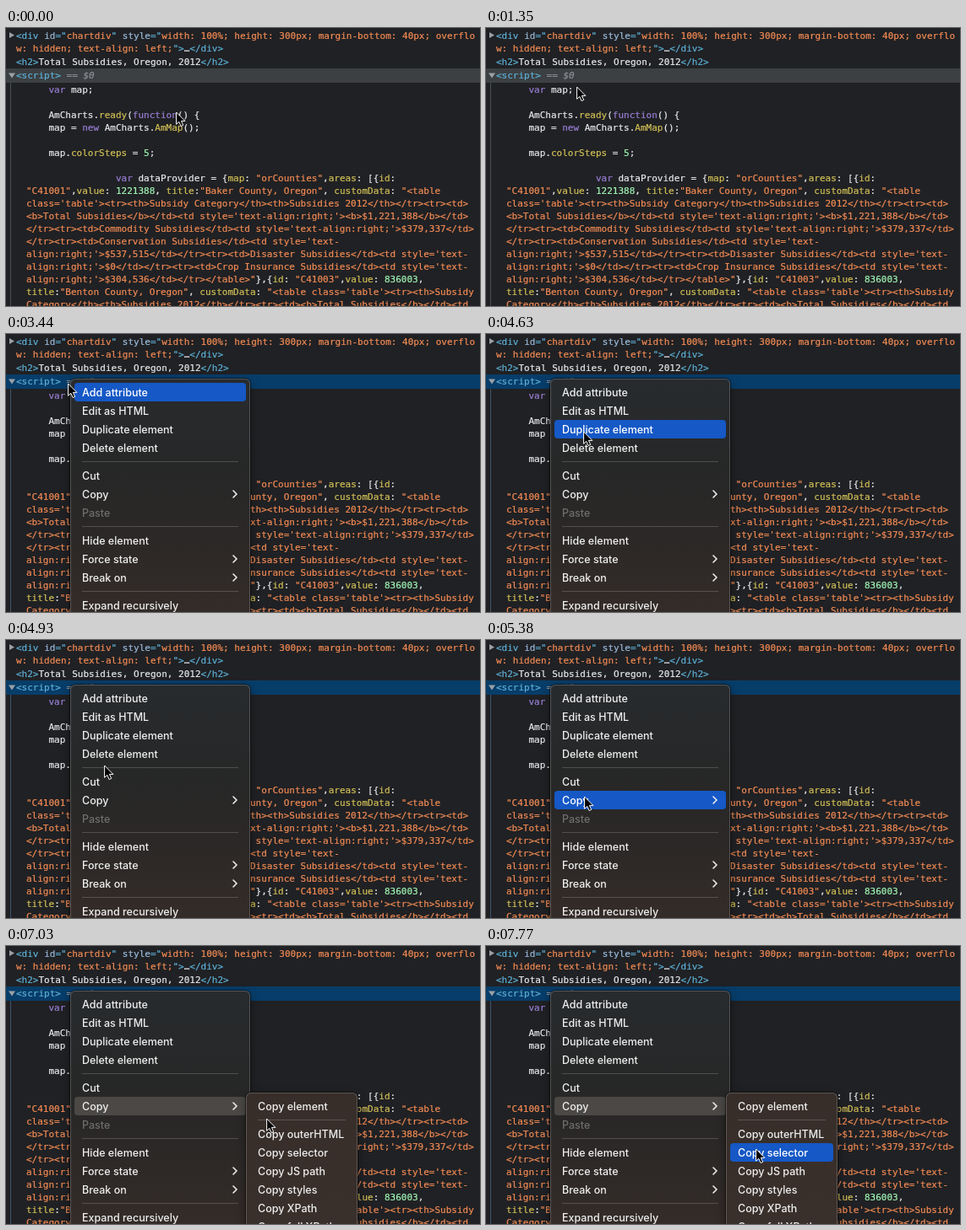
Write an HTML page that moves like this. It is 561 px wide and 330 px high and loops after 8 s.

```html
<!DOCTYPE html>
<html lang="en">
<head>
<meta charset="utf-8">
<title>Copy selector from the elements panel</title>
<style>
  html, body { margin: 0; width: 100%; height: 100%; overflow: hidden; background: #202124; }
  #stage { position: relative; width: 561px; height: 330px; overflow: hidden; background: #202124; }
  #stage > * { position: absolute; }

  .code {
    margin: 0; left: 12px; white-space: pre; color: #e8eaed; -webkit-text-stroke: .2px;
    font: 11px/15px "DejaVu Sans Mono", monospace;
  }
  .tag { color: #5db0d7; }
  .attr { color: #9bbbdc; }
  .str { color: #f28b54; }
  .key { color: #9a7fd5; }
  .prop { color: #d2c057; }
  .num { color: #a1f7b5; }
  .ref { color: #8d9196; }
  .plain { color: #e8eaed; }

  #row { left: 0; top: 48px; width: 561px; height: 17px; background: #3c4043; }
  #row.on { background: #073d69; }
  #guide { left: 5px; top: 65px; width: 1px; height: 265px; background: #4a4e53; }
  #row.on + #guide { background: #3d556d; }
  #source { left: 24px; top: 66px; }

  .menu {
    box-sizing: border-box; padding: 5px; border-radius: 6px; visibility: hidden;
    font: 500 12.5px/24px Inter, "Open Sans", sans-serif; color: #efefef;
    box-shadow: inset 0 0 0 1px rgba(255,255,255,.2), 0 0 0 1px rgba(0,0,0,.5), 0 4px 12px rgba(0,0,0,.4);
  }
  .menu.open { visibility: visible; }
  #main {
    left: 76px; top: 53px; width: 213px; height: 300px;
    background: linear-gradient(#282b2e, #262727 35%, #2b2827 60%, #342c29 95%);
  }
  #sub {
    left: 284px; top: 174px; width: 132px; height: 180px;
    background: linear-gradient(#372e2a, #3a302b);
  }
  .item { position: relative; height: 22px; padding-left: 9px; border-radius: 4px; white-space: nowrap; }
  .item.hot { background: #1558c6; color: #fff; }
  .item.trail { background: #4b4846; }
  .item.off { color: #706d6b; }
  .item svg { position: absolute; right: 9px; top: 6px; }
  hr { height: 1px; margin: 5px 9px; border: 0; background: rgba(255,255,255,.18); }
  #cursor { left: 0; top: 0; overflow: visible; }
</style>
</head>
<body>
<div id="stage">
  <div id="row"></div>
  <div id="guide"></div>
  <svg width="12" height="66" fill="#9aa0a6">
    <path d="M4 5 L10 8.5 L4 12Z M3 53.5 H11 L7 59.5Z"/>
  </svg>

  <pre class="code tag" style="top:2px">&lt;div <span class="attr">id</span>="<span class="str">chartdiv</span>" <span class="attr">style</span>="<span class="str">width: 100%; height: 300px; margin-bottom: 40px; overflo
w: hidden; text-align: left;</span>"&gt;<span class="plain">…</span>&lt;/div&gt;</pre>
  <pre class="code tag" style="top:33px">&lt;h2&gt;<span class="plain">Total Subsidies, Oregon, 2012</span>&lt;/h2&gt;</pre>
  <pre class="code tag" style="top:49px">&lt;script&gt; <span class="ref">== <i>$0</i></span></pre>
  <pre class="code" id="source">    var map;

    AmCharts.ready(function() {
    map = new AmCharts.AmMap();

    map.colorSteps = 5;

                var dataProvider = {map: "orCounties",areas: [{id:
"C41001",value: 1221388, title:"Baker County, Oregon", customData: "&lt;table
class='table'>&lt;tr>&lt;th>Subsidy Category&lt;/th>&lt;th>Subsidies 2012&lt;/th>&lt;/tr>&lt;tr>&lt;td>
&lt;b>Total Subsidies&lt;/b>&lt;/td>&lt;td style='text-align:right;'>&lt;b>$1,221,388&lt;/b>&lt;/td>
&lt;/tr>&lt;tr>&lt;td>Commodity Subsidies&lt;/td>&lt;td style='text-align:right;'>$379,337&lt;/td>
&lt;/tr>&lt;tr>&lt;td>Conservation Subsidies&lt;/td>&lt;td style='text-
align:right;'>$537,515&lt;/td>&lt;/tr>&lt;tr>&lt;td>Disaster Subsidies&lt;/td>&lt;td style='text-
align:right;'>$0&lt;/td>&lt;/tr>&lt;tr>&lt;td>Crop Insurance Subsidies&lt;/td>&lt;td style='text-
align:right;'>$304,536&lt;/td>&lt;/tr>&lt;/table>"},{id: "C41003",value: 836003,
title:"Benton County, Oregon", customData: "&lt;table class='table'>&lt;tr>&lt;th>Subsidy
Category&lt;/th>&lt;th>Subsidies 2012&lt;/th>&lt;/tr>&lt;tr>&lt;td>&lt;b>Total Subsidies&lt;/b>&lt;/td>&lt;td"</pre>

  <div class="menu" id="main"></div>
  <div class="menu" id="sub"></div>
  <svg id="cursor" width="12" height="18">
    <path d="M.6 1 V15.3 L3.8 12.3 L6.1 17.5 L8.7 16.4 L6.4 11.4 H10.9Z" fill="#000" stroke="#fff"/>
  </svg>
</div>

<script>
const LOOP = 8000, STEP = 148;
const $ = id => document.getElementById(id);

// Colour the script text
const kinds = ['str', 'key', 'prop', 'num'];
const tokens = /("[^"]*")|\b(var|new|function)\b|((?<=\.)\w+|\w+(?=:))|\b(\d+)\b/g;
const escape = s => s.replace(/&/g, '&amp;').replace(/</g, '&lt;');
const source = $('source');
const html = [];
let last = 0;
const text = source.textContent;
for (const m of text.matchAll(tokens)) {
  const kind = kinds[m.slice(1).findIndex(Boolean)];
  html.push(escape(text.slice(last, m.index)), `<span class="${kind}">${escape(m[0])}</span>`);
  last = m.index + m[0].length;
}
// The closing quote lies beyond the visible text
source.innerHTML = html.join('').replace(/"<\/span>$/, '</span>');

// Build menus: '-' separator, '>' submenu, '!' disabled
const chevron = '<svg width="8" height="10" fill="none" stroke="#efefef" stroke-width="1.6" ' +
  'stroke-linecap="round" stroke-linejoin="round"><path d="M2 1 L6 5 L2 9"/></svg>';

function build(menu, labels) {
  let y = menu.offsetTop + 5;
  const rows = [];
  for (const label of labels) {
    if (label === '-') {
      menu.append(document.createElement('hr'));
      y += 11;
      continue;
    }
    const el = document.createElement('div');
    el.className = 'item' + (label.endsWith('!') ? ' off' : '');
    el.textContent = label.replace(/[>!]$/, '');
    if (label.endsWith('>')) el.innerHTML += chevron;
    menu.append(el);
    rows.push({ el, y });
    y += 22;
  }
  return rows;
}
const mainRows = build($('main'), ['Add attribute', 'Edit as HTML', 'Duplicate element',
  'Delete element', '-', 'Cut', 'Copy>', 'Paste!', '-', 'Hide element', 'Force state>',
  'Break on>', '-', 'Expand recursively']);
const subRows = build($('sub'), ['Copy element', '-', 'Copy outerHTML', 'Copy selector',
  'Copy JS path', 'Copy styles', 'Copy XPath', 'Copy full XPath']);
const copyRow = mainRows[5];

// Each move eases out to (x, y) in whole steps; px and py set the ease per axis
const home = { x: 201, y: 99 };
const moves = [
  { at: 600, steps: 9, x: 73, y: 58, px: 1.2, py: 1.2 },
  { at: 4340, steps: 8, x: 116, y: 185, px: 8, py: 1.27 },
  { at: 5980, steps: 6, x: 303, y: 197, px: 1.1, py: 0.6 },
  { at: 7030, steps: 6, x: 319, y: 240, px: 2, py: 1 }
];
const easeOut = (u, power) => 1 - (1 - u) ** power;

function pointer(t) {
  let { x, y } = home;
  for (const m of moves) {
    const done = Math.floor((t - m.at) / STEP + 1.05);
    const u = Math.min(Math.max(done, 0), m.steps) / m.steps;
    x += (m.x - x) * easeOut(u, m.px);
    y += (m.y - y) * easeOut(u, m.py);
  }
  return { x: Math.round(x), y: Math.round(y) };
}

function mark(rows, y) {
  for (const r of rows) r.el.classList.toggle('hot', y >= r.y && y < r.y + 22);
}

function draw(now) {
  const t = now % LOOP;
  const { x, y } = pointer(t);
  const subOpen = t >= 5530;
  const inSub = subOpen && x >= 289;

  $('cursor').style.transform = `translate(${x}px, ${y}px)`;
  $('row').classList.toggle('on', t >= 2240);
  $('main').classList.toggle('open', t >= 3440);
  $('sub').classList.toggle('open', subOpen);
  mark(mainRows, inSub ? -1 : y);
  mark(subRows, inSub ? y : -1);
  copyRow.el.classList.toggle('trail', inSub);
}

const start = performance.now();
function tick() {
  draw(performance.now() - start);
  requestAnimationFrame(tick);
}
tick();
</script>
</body>
</html>
```
